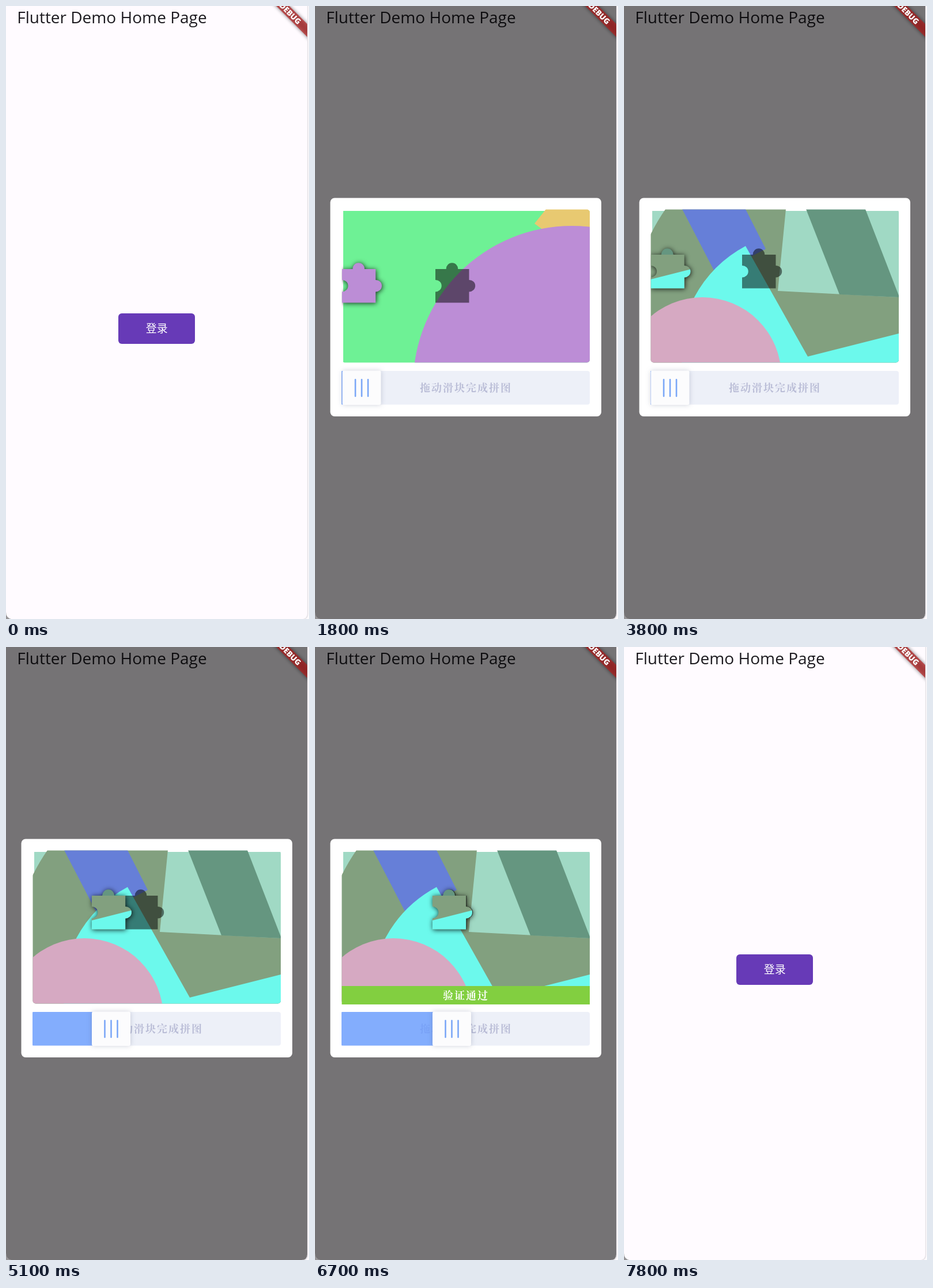
An HTML page for the animation above (10 s loop, 526 by 1065 pixels).

```html
<!DOCTYPE html>
<html lang="zh-CN">
<head>
<meta charset="utf-8">
<title>Slider captcha</title>
<style>
  html, body { margin: 0; width: 100%; height: 100%; overflow: hidden; background: #fdfbfd; }
  svg { display: block; }
  .hint, .banner text { font: bold 18px "Noto Serif CJK SC", "Noto Sans CJK SC", serif; letter-spacing: 2px; }
  .hint { fill: #b9bcd6; }
  .banner text { fill: #fff; }
  .piece { filter: drop-shadow(1px 1px 4px rgba(0, 0, 0, .8)); }
  #handle rect { filter: drop-shadow(0 0 4px rgba(60, 70, 110, .25)); }
</style>
</head>
<body>
<svg width="526" height="1065" viewBox="0 0 526 1065">
  <defs>
    <path id="jigsaw" d="M0 0H18.7A10.26 10.26 0 1 1 39.2 0H58.5V18.9A10.26 10.26 0 1 1 58.5 39.4V58.5H0V39.4A10.26 10.26 0 1 0 0 18.9Z"/>
    <clipPath id="jigsawClip"><use href="#jigsaw"/></clipPath>
    <clipPath id="pictureClip"><rect x="46.5" y="353.5" width="430.5" height="266" rx="5"/></clipPath>
    <clipPath id="bannerClip"><rect x="46" y="353" width="431.5" height="268"/></clipPath>
    <clipPath id="windowClip"><path id="window" d="M0 0H523V1055Q523 1065 513 1065H9Q0 1063 0 1053Z"/></clipPath>
    <filter id="blur" x="-20%" y="-100%" width="140%" height="300%"><feGaussianBlur stdDeviation="3"/></filter>
  </defs>

  <rect y="1050" width="12" height="15" fill="#969496"/>
  <path d="M523.5 0V1056Q523.5 1064 516 1065" fill="none" stroke="#e6e2e7" stroke-width="2"/>
  <use href="#window" fill="#fffbff"/>
  <text x="19.3" y="29.5" font-family="Open Sans, Noto Sans, sans-serif" font-size="28" fill="#1d1b20">Flutter Demo Home Page</text>
  <g id="button">
    <rect x="195" y="534" width="133" height="53" rx="6" fill="#673ab7"/>
    <text x="261.7" y="567" text-anchor="middle" font-family="Noto Sans CJK SC, sans-serif" font-size="19" fill="#fff">登录</text>
  </g>
  <use id="barrier" href="#window"/>

  <g id="dialog">
    <rect x="26.5" y="333.5" width="470.5" height="379.5" rx="7.5" fill="#fff"/>

    <g id="picture" clip-path="url(#pictureClip)">
      <g id="scene1">
        <path fill="#6ef195" d="M49 356H477V620H49Z"/>
        <path fill="#e8c971" d="M401 353H477V400H411L381 378Z"/>
        <circle cx="446" cy="657.7" r="275.7" fill="#bc8dd6"/>
        <use href="#jigsaw" x="209" y="457" opacity=".5"/>
        <g class="piece"><use href="#jigsaw" fill="#bc8dd6"/></g>
      </g>
      <g id="scene2">
        <path fill="#a0d9c4" d="M49 356H477V620H49Z"/>
        <path fill="#82a07f" d="M46 397Q58 373 72 353H281L267 495L477 506V620H46Z"/>
        <path fill="#659680" d="M316 353H419L477 503V506L374 501Z"/>
        <path fill="#667fd8" d="M101 353H211L246 422L221 435L156 468V459Z"/>
        <path fill="#6cf9ec" d="M122 506A218 218 0 0 1 211 417L319 609L477 569V620H100Z"/>
        <circle cx="136" cy="643" r="137" fill="#d6a9c2"/>
        <use href="#jigsaw" x="205" y="432" opacity=".5"/>
        <g class="piece">
          <g clip-path="url(#jigsawClip)">
            <path fill="#82a07f" d="M-1 -1H71V60H-1Z"/>
            <path fill="#659680" d="M10 -12H50V0H10Z"/>
            <path fill="#6cf9ec" d="M-1 43.3L71 25V60H-1Z"/>
          </g>
        </g>
      </g>
    </g>

    <g clip-path="url(#bannerClip)">
      <g id="failed" class="banner">
        <rect x="46.5" y="589" width="430.5" height="32" fill="#cc5749"/>
        <text x="182" y="611.5">验证失败，请重试</text>
      </g>
      <g id="passed" class="banner">
        <rect x="46.5" y="589" width="430.5" height="32" fill="#82cf40"/>
        <text x="222" y="611.5">验证通过</text>
      </g>
    </g>

    <rect x="46" y="634" width="431" height="58.5" rx="4" fill="#edf0f8"/>
    <text class="hint" x="182" y="670">拖动滑块完成拼图</text>
    <rect id="fill" x="46" y="634" height="58.5" rx="1" fill="#6a9dff" opacity=".8"/>
    <g id="handle">
      <rect y="633.5" width="67" height="59.5" rx="3" fill="#fcfcfd"/>
      <path d="M22.5 649V678M33.5 649V678M44.5 649V678" stroke="#7ba7f7" stroke-width="2.6" stroke-linecap="round"/>
    </g>
  </g>

  <g clip-path="url(#windowClip)">
    <g transform="translate(493.5 13) rotate(45)">
      <rect x="-60" y="-8" width="120" height="16" opacity=".5" filter="url(#blur)"/>
      <rect x="-60" y="-8" width="120" height="16" fill="#b71c1c" opacity=".68"/>
      <text y="4.8" text-anchor="middle" font-family="Open Sans, Noto Sans, sans-serif" font-size="13.4" font-weight="800" fill="#fff">DEBUG</text>
    </g>
  </g>
</svg>

<script>
  const LOOP = 10000, STEP = 100;
  const get = id => document.getElementById(id);
  const show = (id, on) => get(id).setAttribute('display', on ? 'inline' : 'none');
  const move = (el, x, y) => el.setAttribute('transform', `translate(${x} ${y})`);
  const ramp = (t, from, to) => Math.min(1, Math.max(0, (t - from) / (to - from)));
  const smooth = (t, from, to) => {
    const u = ramp(t, from, to);
    return u * u * (3 - 2 * u);
  };
  const pieces = document.querySelectorAll('.piece');

  function dragOffset(t) {
    if (t < 3700) return 246.4 * smooth(t, 1780, 2300);
    return 102.5 * smooth(t, 4660, 5100) + 55 * smooth(t, 5220, 6200);
  }

  function render(t) {
    const open = ramp(t, 832, 982) - ramp(t, 7590, 7740);
    const fade = 1 - (1 - open) ** 1.6;
    get('barrier').setAttribute('opacity', 0.54 * (1 - (1 - open) ** 2.2));
    get('dialog').setAttribute('opacity', fade);
    get('button').setAttribute('opacity', 1 - fade);
    show('dialog', open > 0);

    show('picture', t >= 1000);
    show('scene1', t < 3700);
    show('scene2', t >= 3700);

    const x = 46.5 + dragOffset(t);
    move(get('handle'), x, 0);
    get('fill').setAttribute('width', x - 45);
    move(pieces[0], x - 0.8, 457);
    move(pieces[1], x - 0.3, 432);

    const failed = ramp(t, 2400, 2800) - ramp(t, 3600, 3800);
    move(get('failed'), 0, 33 * (1 - failed));
    move(get('passed'), 0, 33 * (1 - ramp(t, 6300, 6700)));
  }

  function tick() {
    const t = performance.now() % LOOP;
    render(Math.floor(t / STEP) * STEP);
    requestAnimationFrame(tick);
  }
  tick();
</script>
</body>
</html>
```
